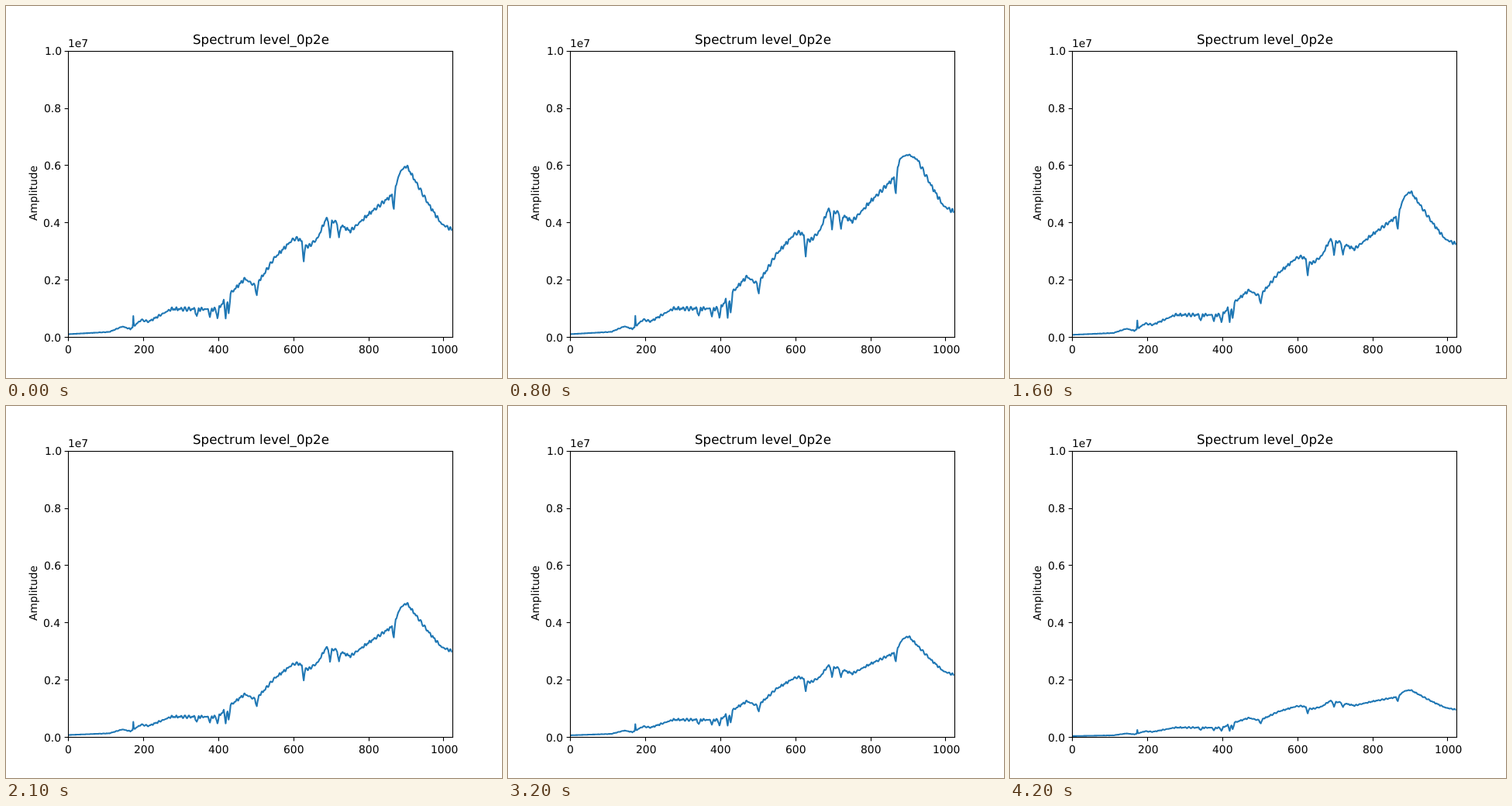
These frames come from a looping animation (640x480 px, 4300 ms). An HTML page with a canvas:

```html
<!DOCTYPE html>
<html lang="en">
<head>
<meta charset="utf-8">
<title>Spectrum</title>
<style>
html, body { margin: 0; width: 100%; height: 100%; overflow: hidden; background: #fff; }
canvas { display: block; }
</style>
</head>
<body>
<canvas id="stage" width="640" height="480"></canvas>
<script>
const ctx = document.getElementById('stage').getContext('2d');
const LOOP = 4300, STEP = 100, BINS = 1024;
const LEFT = 80, RIGHT = 576, TOP = 57.6, BOTTOM = 427.2;
const HAIRLINE = 1.11, TICK = 4.86;

// Key points of the outline: bin, amplitude in millions.
const OUTLINE = [
  [0, .1], [110, .18], [145, .37], [166, .28], [195, .6], [215, .54], [275, .98],
  [400, .97], [415, 1.25], [440, 1.62], [471, 2.04], [497, 1.8], [517, 2.1],
  [549, 2.75], [598, 3.4], [612, 3.45], [640, 3.15], [665, 3.45], [687, 4.12],
  [715, 4], [752, 3.7], [800, 4.28], [865, 4.98], [886, 5.8], [902, 5.98],
  [960, 4.65], [995, 3.95], [1023, 3.75]
];

// Narrow notches and one spike: bin, relative depth.
const NOTCHES = [
  [174, .9], [343, -.27], [378, -.27], [398, -.3], [420, -.48], [428, -.42],
  [503, -.24], [628, -.19], [698, -.15], [722, -.13], [868, -.12]
];

// Gain at the low and the high end of the band: ms, low, high.
const GAIN = [
  [0, 1, 1], [400, 1.07, 1.22], [600, 1.08, 1.27], [1100, .92, 1.013], [1800, .74, .81],
  [2100, .725, .8], [2800, .69, .715], [3700, .53, .41], [4200, .34, .255]
];

function interpolate(points, x, column = 1) {
  const i = Math.max(1, points.findIndex(p => p[0] >= x));
  const a = points[i - 1], b = points[i];
  return a[column] + (b[column] - a[column]) * (x - a[0]) / (b[0] - a[0]);
}

function baseAmplitude(bin) {
  const ripple = Math.sin(bin * .55) + Math.sin(bin * .83 + 2 * Math.sin(bin * .11));
  let level = interpolate(OUTLINE, bin) + .035 * Math.min(1, (bin / 300) ** 2) * ripple;
  for (const [center, depth] of NOTCHES) {
    const halfWidth = depth > 0 ? 1.5 : 5;
    level *= 1 + depth * Math.max(0, 1 - Math.abs(bin - center) / halfWidth);
  }
  return level;
}

const base = Array.from({ length: BINS }, (_, bin) => baseAmplitude(bin));

// Strong signals flatten near the top.
const saturate = v => v > 6.2 ? 6.2 + (v - 6.2) * .3 : v;
const toX = bin => LEFT + (RIGHT - LEFT) * bin / BINS;
const toY = v => BOTTOM - (BOTTOM - TOP) * v / 10;
const snap = v => Math.floor(v + .5) + .5;

function drawCurve(time) {
  const low = interpolate(GAIN, time, 1), high = interpolate(GAIN, time, 2);
  ctx.beginPath();
  base.forEach((v, bin) => {
    const blend = Math.max(0, (bin - 280) / (BINS - 280)) ** 1.5;
    ctx.lineTo(toX(bin), toY(saturate(v * (low + (high - low) * blend))));
  });
  ctx.strokeStyle = '#1f77b4';
  ctx.lineWidth = 2.083;
  ctx.lineJoin = 'round';
  ctx.stroke();
}

function horizontal(x0, x1, y) {
  ctx.fillRect(x0, snap(y) - HAIRLINE / 2, x1 - x0, HAIRLINE);
}

function vertical(x, y0, y1) {
  ctx.fillRect(snap(x) - HAIRLINE / 2, y0, HAIRLINE, y1 - y0);
}

// The visible ink width sets the alignment; the pen starts on a whole pixel.
function label(text, x, y, align, size = 13.89) {
  ctx.font = `${size}px "DejaVu Sans", sans-serif`;
  ctx.textRendering = 'geometricPrecision';
  const box = ctx.measureText(text);
  const ink = box.actualBoundingBoxLeft + box.actualBoundingBoxRight;
  ctx.fillText(text, Math.round(x - ink * align), Math.round(y));
}

function drawAxes() {
  ctx.fillStyle = '#000';
  const x0 = snap(LEFT), x1 = snap(RIGHT), y0 = snap(TOP), y1 = snap(BOTTOM);
  const cap = HAIRLINE / 2;
  for (const y of [TOP, BOTTOM]) horizontal(x0 - cap, x1 + cap, y);
  for (const x of [LEFT, RIGHT]) vertical(x, y0 - cap, y1 + cap);
  for (let i = 0; i <= 5; i++) {
    const x = toX(i * 200), y = toY(i * 2);
    vertical(x, y1, y1 + TICK);
    horizontal(x0 - TICK, x0, y);
    label(String(i * 200), x, 448, .5);
    label((i / 5).toFixed(1), 70.3, y + 5.4, 1);
  }
  label('1e7', LEFT, 53, 0);
  label('Spectrum level_0p2e', (LEFT + RIGHT) / 2, 49, .5, 16.67);
  ctx.save();
  ctx.translate(40, 242);
  ctx.rotate(-Math.PI / 2);
  label('Amplitude', 0, 0, .5);
  ctx.restore();
}

function render(now) {
  const time = Math.floor((now % LOOP) / STEP) * STEP;
  ctx.fillStyle = '#fff';
  ctx.fillRect(0, 0, 640, 480);
  drawCurve(time);
  drawAxes();
}

const start = performance.now();
function tick() {
  render(performance.now() - start);
  requestAnimationFrame(tick);
}
tick();
</script>
</body>
</html>
```
